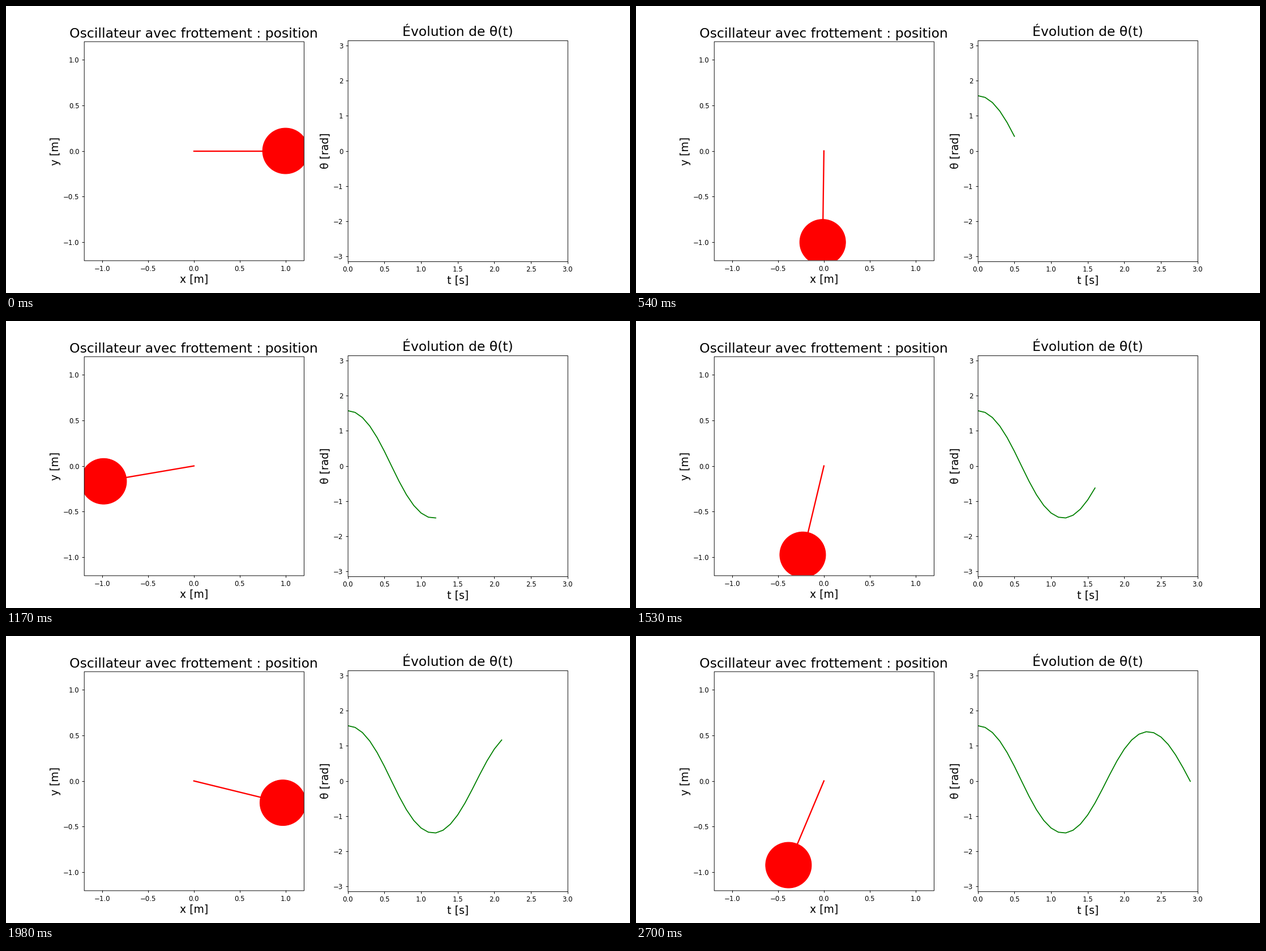
Recreate the animation shown at these times as a matplotlib script. Size 1102 px wide and 508 px high, loop 2.79 s.

```python
import numpy as np
import matplotlib.pyplot as plt
from matplotlib.animation import FuncAnimation

WIDTH, HEIGHT, DPI = 1102, 508, 84.75
GRAVITY, LENGTH, FRICTION = 9.835, 1.0, 0.086
STEP, SUBSTEPS, FRAMES = 0.1, 20, 31


def slope(state):
    angle, speed = state
    return np.array([speed, -GRAVITY / LENGTH * np.sin(angle) - FRICTION * speed])


def rk4(state, h):
    a = slope(state)
    b = slope(state + h / 2 * a)
    c = slope(state + h / 2 * b)
    d = slope(state + h * c)
    return state + h / 6 * (a + 2 * b + 2 * c + d)


def swing():
    """Angle of the damped pendulum, released at rest from the horizontal."""
    state = np.array([np.pi / 2, 0.0])
    angles = [state[0]]
    for _ in range(FRAMES - 1):
        for _ in range(SUBSTEPS):
            state = rk4(state, STEP / SUBSTEPS)
        angles.append(state[0])
    return np.array(angles)


def label(ax, title, xlabel, ylabel):
    ax.set_title(title, fontsize=20)
    ax.set_xlabel(xlabel, fontsize=16, labelpad=2.7)
    ax.set_ylabel(ylabel, fontsize=16, labelpad=3.4)


def soft_frame(ax, dx=0.45, dy=0.45):
    """Outline the axes between pixels, so the edges stay antialiased."""
    ax.spines[:].set_visible(False)
    box = ax.get_position()
    corner = box.x0 + dx / WIDTH, box.y0 - dy / HEIGHT
    fig.add_artist(plt.Rectangle(corner, box.width, box.height, fill=False,
                                 lw=0.8, snap=False, transform=fig.transFigure))


times = STEP * np.arange(FRAMES)
theta = swing()

plt.rcParams["font.family"] = "DejaVu Sans"
fig, (space, graph) = plt.subplots(1, 2, figsize=(WIDTH / DPI, HEIGHT / DPI), dpi=DPI)

# A square panel, centred on the height of its neighbour.
panel = space.get_position()
side = panel.width * 13 / 6
space.set_position([panel.x0, (panel.y0 + panel.y1 - side) / 2, panel.width, side])

space.set(xlim=(-1.2, 1.2), ylim=(-1.2, 1.2))
label(space, "Oscillateur avec frottement : position", "x [m]", "y [m]")
graph.set(xlim=(0, 3), ylim=(-np.pi, np.pi))
label(graph, "Évolution de θ(t)", "t [s]", "θ [rad]")
for ax in (space, graph):
    soft_frame(ax)

rod, = space.plot([], [], color="red", lw=2)
bob = space.add_patch(plt.Circle((0, 0), 0.25, color="red", lw=1))
curve, = graph.plot([], [], color="green", lw=1.5)


def draw(i):
    x, y = LENGTH * np.sin(theta[i]), -LENGTH * np.cos(theta[i])
    rod.set_data([0, x], [0, y])
    bob.center = x, y
    # The curve trails the pendulum by one step.
    curve.set_data(times[:i], theta[:i])
    return rod, bob, curve


animation = FuncAnimation(fig, draw, frames=FRAMES, interval=90, repeat=True)
plt.show()
```
